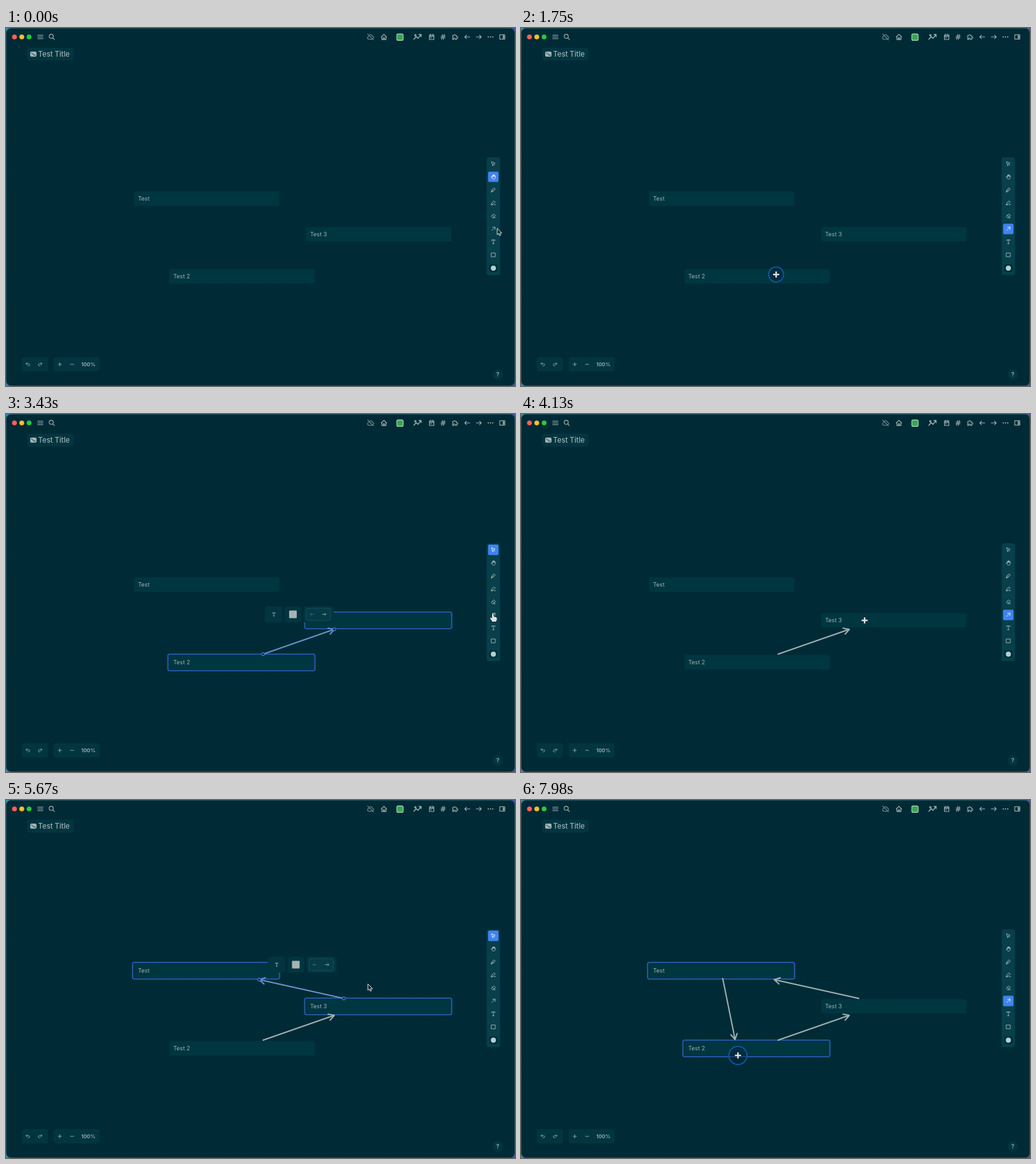
Animation of 800x562 px, one loop 8 s. Source, as an HTML page with a canvas:

```html
<!DOCTYPE html>
<html lang="en">
<head>
<meta charset="utf-8">
<title>Whiteboard connectors</title>
<style>
html, body { margin: 0; width: 100%; height: 100%; overflow: hidden; background: #002b36; }
canvas { display: block; width: 800px; height: 562px; }
</style>
</head>
<body>
<canvas id="stage"></canvas>
<script>
const W = 800, H = 562, LOOP = 8000;
const canvas = document.getElementById('stage');
const ctx = canvas.getContext('2d');
const dpr = window.devicePixelRatio || 1;
canvas.width = W * dpr;
canvas.height = H * dpr;

const BG = '#002b36', BLOCK = '#003640', PANEL = '#023540', TOOLBAR = '#073f4a';
const TEXT = '#9fb0b1', ICON = '#a3b3b4', BLUE = '#3f83f0', OUTLINE = '#2157a0';

// Icon outlines on a 24-unit square
const ICONS = {
  menu: 'M3 6h18M3 12h18M3 18h18',
  search: 'M10 3a7 7 0 1 0 0 14a7 7 0 1 0 0-14M15 15l6 6',
  cloudOff: 'M9 6c4-2 8 0 9 4c4 0 5 5 2 7M17 19H7c-6 0-6-8 0-9M3 3l18 18',
  home: 'M3 12L12 3l9 9M5 10v11h14V10M10 21v-6h4v6',
  trend: 'M1 19l7-8l5 5l9-11M16 5h6v6M3 7h5M5 5v5',
  calendar: 'M4 5h16v16H4zM8 2v5M16 2v5M4 10h16M8 15h3',
  hash: 'M5 9h15M4 15h15M11 3L7 21M17 3l-4 18',
  puzzle: 'M4 7h4a3 3 0 1 1 6 0h4v5a3 3 0 1 1 0 5v4h-5a3 3 0 1 0-5 0H4v-5a3 3 0 0 0 0-5z',
  left: 'M21 12H3M9 6l-6 6l6 6',
  right: 'M3 12h18M15 6l6 6l-6 6',
  sidebar: 'M3 4h18v16H3zM15 4v16M18 8v8',
  select: 'M5 4l14 6l-6 3l-3 7zM13 13l5 5',
  hand: 'M8 13V6a2 2 0 0 1 3 0v5V4a2 2 0 0 1 3 0v7V5a2 2 0 0 1 3 0v7V8a2 2 0 0 1 3 0v7c0 8-10 9-13 4l-4-6c0-2 3-2 5 1',
  pen: 'M3 21l3-9l9-8l5 5l-8 9zM3 21l9-9',
  marker: 'M3 19l4-8l8-7l5 5l-8 8zM3 21h6M15 20h6',
  eraser: 'M9 20l-6-6L14 4l7 7l-9 9zM8 9l8 8M12 20h8',
  arrow: 'M5 19L19 5M9 5h10v10',
  text: 'M5 7V4h14v3M12 4v16M9 20h6',
  box: 'M4 4h16v16H4z',
  undo: 'M8 14L3 9l5-5M3 9h12a5 5 0 0 1 0 10h-3',
  redo: 'M16 14l5-5l-5-5M21 9H9a5 5 0 0 0 0 10h3',
  plus: 'M12 4v16M4 12h16',
  minus: 'M4 12h16',
};
for (const name in ICONS) ICONS[name] = new Path2D(ICONS[name]);

const TOOLS = ['select', 'hand', 'pen', 'marker', 'eraser', 'arrow', 'text', 'box'];

const BLOCKS = [
  { label: 'Test', x: 199, y: 255 },
  { label: 'Test 3', x: 469.5, y: 311 },
  { label: 'Test 2', x: 254.5, y: 377 },
];
const [TEST, TEST3, TEST2] = BLOCKS;
const BLOCK_W = 231, BLOCK_H = 26;

// pick: arrow tool clicked; done: connector finished and selected
const CONNECTORS = [
  { from: TEST2, to: TEST3, start: [404, 377], tip: [516, 338], pick: 540, press: 1800, done: 2520 },
  { from: TEST3, to: TEST, start: [531, 311.5], tip: [398, 282], pick: 3540, press: 4190, done: 4880 },
  { from: TEST, to: TEST2, start: [317, 280], tip: [336.5, 376], pick: 6600, press: 7340, done: Infinity },
];
const PRESSES = [[480, 600], [1680, 2420], [3480, 3590], [4140, 4850], [6560, 6680], [7290, Infinity]];

// time, x, y of the pointer
const POINTER = [
  [0, 773, 320], [350, 766, 317], [800, 766, 317], [1600, 401, 387], [1800, 401, 387],
  [2400, 533, 333], [2620, 533, 333], [3350, 766, 319], [3650, 766, 319], [4080, 540, 324],
  [4190, 540, 324], [4720, 325, 267], [5000, 325, 267], [6250, 766, 316], [6760, 766, 316],
  [7230, 314, 266], [7340, 314, 266], [7920, 341, 401], [8000, 341, 401],
];

function pointerAt(t) {
  const i = POINTER.findIndex(key => key[0] > t);
  const [t0, x0, y0] = POINTER[i - 1], [t1, x1, y1] = POINTER[i];
  const u = (t - t0) / (t1 - t0), e = u * u * (3 - 2 * u);
  return [x0 + (x1 - x0) * e, y0 + (y1 - y0) * e];
}

function rect(x, y, w, h, r, fill, stroke, lineWidth = 1) {
  ctx.beginPath();
  ctx.roundRect(x, y, w, h, r);
  if (fill) { ctx.fillStyle = fill; ctx.fill(); }
  if (stroke) { ctx.strokeStyle = stroke; ctx.lineWidth = lineWidth; ctx.stroke(); }
}

function circle(x, y, r, fill, stroke, lineWidth) {
  rect(x - r, y - r, 2 * r, 2 * r, r, fill, stroke, lineWidth);
}

function text(str, x, y, size, weight = 400, align = 'left') {
  ctx.font = `${weight} ${size}px Inter, sans-serif`;
  ctx.textAlign = align;
  ctx.textBaseline = 'alphabetic';
  ctx.fillStyle = TEXT;
  ctx.fillText(str, x, y);
}

function icon(name, x, y, size = 10, color = ICON) {
  ctx.save();
  ctx.translate(x, y);
  ctx.scale(size / 24, size / 24);
  ctx.translate(-12, -12);
  ctx.strokeStyle = color;
  ctx.lineWidth = 2.5;
  ctx.stroke(ICONS[name]);
  ctx.restore();
}

function drawBackdrop() {
  const edge = ctx.createLinearGradient(0, 0, W, 0);
  edge.addColorStop(0, '#3291b4');
  edge.addColorStop(1, '#4b55b0');
  ctx.fillStyle = edge;
  ctx.fillRect(0, 0, W, H);
  rect(0.5, 0.5, W - 1, H - 1, 7, BG, '#224e59');
  ctx.fillStyle = '#123f49';
  for (let y = 14; y < H - 4; y += 20.7)
    for (let x = 10; x < W - 4; x += 20.7) if (y > 25) ctx.fillRect(x, y, 1, 1);
}

function drawHeader() {
  ['#ff5f57', '#febc2e', '#28c840'].forEach((color, i) => circle(13.3 + i * 11.5, 14, 3.8, color));
  icon('menu', 54, 14, 11);
  icon('search', 72, 14, 11);
  icon('cloudOff', 573, 14, 12, '#657f84');
  icon('home', 594, 14, 11);
  rect(614.2, 9.4, 10, 10, 2, '#32a852', '#b5d5bd', 1.1);
  const right = { trend: 647, calendar: 669, hash: 687, puzzle: 705.5, left: 725, right: 743, sidebar: 780 };
  for (const name in right) icon(name, right[name], 14, name === 'trend' ? 13 : 10.5);
  for (const x of [758, 761.5, 765]) circle(x, 14, 1, ICON);

  rect(33, 31, 73, 20, 4, PANEL);
  rect(38, 37, 10, 8, 2, ICON);
  ctx.beginPath();
  ctx.moveTo(40, 39.5);
  ctx.bezierCurveTo(43, 39, 42, 44, 46, 42.5);
  ctx.strokeStyle = BG;
  ctx.lineWidth = 1;
  ctx.stroke();
  text('Test Title', 50.5, 45, 11.3, 500);
}

function drawFooter() {
  rect(25, 517, 41, 22, 3, PANEL);
  rect(75, 517, 72, 22, 3, PANEL);
  icon('undo', 34.5, 528, 8);
  icon('redo', 53.5, 528, 8);
  icon('plus', 84.5, 528, 8);
  icon('minus', 104, 528, 8);
  text('100%', 129.5, 531.3, 8.2, 600, 'center');
  circle(773, 544, 8, PANEL);
  text('?', 773, 547.3, 9, 600, 'center');
}

function drawToolbar(active) {
  rect(755.5, 203, 21, 185, 4, TOOLBAR);
  TOOLS.forEach((name, i) => {
    const y = 213 + i * 20.45;
    if (name === active) rect(757.7, y - 8, 16.4, 16.4, 2, BLUE);
    icon(name, 766, y, 9, name === active ? '#e4edf8' : ICON);
  });
  rect(759.5, 371, 13, 12, 3, '#022e39');
  circle(766, 377, 4, '#b2d0d2');
}

function drawBlock(block, outlined) {
  const { x, y, label } = block;
  rect(x + 2.5, y + 1.5, BLOCK_W - 3, BLOCK_H - 3.5, 3, BLOCK);
  if (outlined) rect(x, y, BLOCK_W, BLOCK_H, 3, null, OUTLINE, 2.2);
  text(label, x + 8.4, y + 16, 9.1);
}

function drawConnector([x0, y0], [x1, y1], selected) {
  const angle = Math.atan2(y1 - y0, x1 - x0);
  const size = Math.min(10, Math.hypot(x1 - x0, y1 - y0) / 2);
  ctx.beginPath();
  ctx.moveTo(x0, y0);
  ctx.lineTo(x1, y1);
  for (const side of [-0.52, 0.52]) {
    ctx.moveTo(x1, y1);
    ctx.lineTo(x1 - size * Math.cos(angle + side), y1 - size * Math.sin(angle + side));
  }
  ctx.strokeStyle = selected ? '#6a91c9' : '#a0b0b1';
  ctx.lineWidth = 2;
  ctx.stroke();
  if (selected) for (const [x, y] of [[x0, y0], [x1, y1]]) circle(x, y, 2.3, BG, '#397bdc', 1.2);
}

function drawContextBar({ start, tip }) {
  const x = (start[0] + tip[0]) / 2 - 53, y = Math.min(start[1], tip[1]) - 36;
  rect(x, y, 108, 25, 3, BG);
  rect(x, y, 27, 25, 3, PANEL);
  rect(x + 31, y, 26, 25, 3, PANEL);
  rect(x + 61, y, 47, 25, 3, PANEL);
  icon('text', x + 14, y + 12.5, 7.5);
  rect(x + 38, y + 6.5, 12, 12, 1, '#a5b3b3');
  rect(x + 65, y + 3, 38, 19, 3, '#053b46', '#1d4c57');
  icon('left', x + 74, y + 12.5, 7.5, '#4d6d73');
  icon('right', x + 93, y + 12.5, 7.5);
}

function drawRipple(t, x, y) {
  for (const [down, up] of PRESSES) {
    if (t < down || t > up + 150) continue;
    const grow = Math.min(1, (t - down) / 220);
    const fade = Math.max(0, (t - up) / 150);
    ctx.globalAlpha = 1 - fade;
    circle(x, y, 10.5 + 3.7 * grow + 6 * fade, 'rgba(0,32,66,.4)', '#14539b', 2);
    ctx.globalAlpha = 1;
  }
}

function drawPointer(x, y, tool) {
  ctx.save();
  ctx.translate(x, y);
  ctx.lineWidth = 1;
  ctx.strokeStyle = '#10242a';
  ctx.fillStyle = '#dce3e3';
  if (x > 756 && x < 772) {
    const hand = new Path2D('M-2-5q1.5-2 2.5 0v4l4 1q1.5 1 1 4l-1.5 3h-5.500l-3.500-5q0-2 3-.5z');
    ctx.stroke(hand);
    ctx.fill(hand);
  } else if (tool === 'arrow') {
    ctx.fillStyle = '#10242a';
    ctx.fillRect(-5.7, -2, 11.4, 4);
    ctx.fillRect(-2, -5.7, 4, 11.4);
    ctx.fillStyle = '#dce3e3';
    ctx.fillRect(-4.8, -1.2, 9.6, 2.4);
    ctx.fillRect(-1.2, -4.8, 2.4, 9.6);
  } else {
    const arrow = new Path2D('M-1-5v9.500l2.200-2l1.600 3.500l1.800-.8l-1.600-3.200h3z');
    ctx.fillStyle = '#10242a';
    ctx.fill(arrow);
    ctx.strokeStyle = '#dce3e3';
    ctx.stroke(arrow);
  }
  ctx.restore();
}

const inside = (block, x, y) =>
  x >= block.x && x <= block.x + BLOCK_W && y >= block.y && y <= block.y + BLOCK_H;

function render(t) {
  const [px, py] = pointerAt(t);
  const latest = CONNECTORS.findLast(c => t >= c.pick);
  const tool = !latest ? 'hand' : t >= latest.done ? 'select' : 'arrow';
  const selected = tool === 'select' ? latest : null;
  const dragging = tool === 'arrow' && t > latest.press ? latest : null;
  const reached = dragging && inside(dragging.to, px, py);
  const outlined = block =>
    (selected && (block === selected.from || block === selected.to)) ||
    (dragging && (block === dragging.from || (reached && block === dragging.to)));

  ctx.setTransform(dpr, 0, 0, dpr, 0, 0);
  ctx.lineCap = ctx.lineJoin = 'round';
  drawBackdrop();
  drawHeader();
  drawFooter();
  for (const block of BLOCKS) drawBlock(block, outlined(block));
  for (const c of CONNECTORS) {
    if (t >= c.done) drawConnector(c.start, c.tip, c === selected);
    else if (c === dragging && !inside(c.from, px, py))
      drawConnector(c.start, reached ? c.tip : [px, py], false);
  }
  if (selected) drawContextBar(selected);
  drawToolbar(tool);
  drawRipple(t, px, py);
  drawPointer(px, py, tool);
}

const begin = performance.now();
function tick() {
  render((performance.now() - begin) % LOOP);
  requestAnimationFrame(tick);
}
tick();
</script>
</body>
</html>
```
